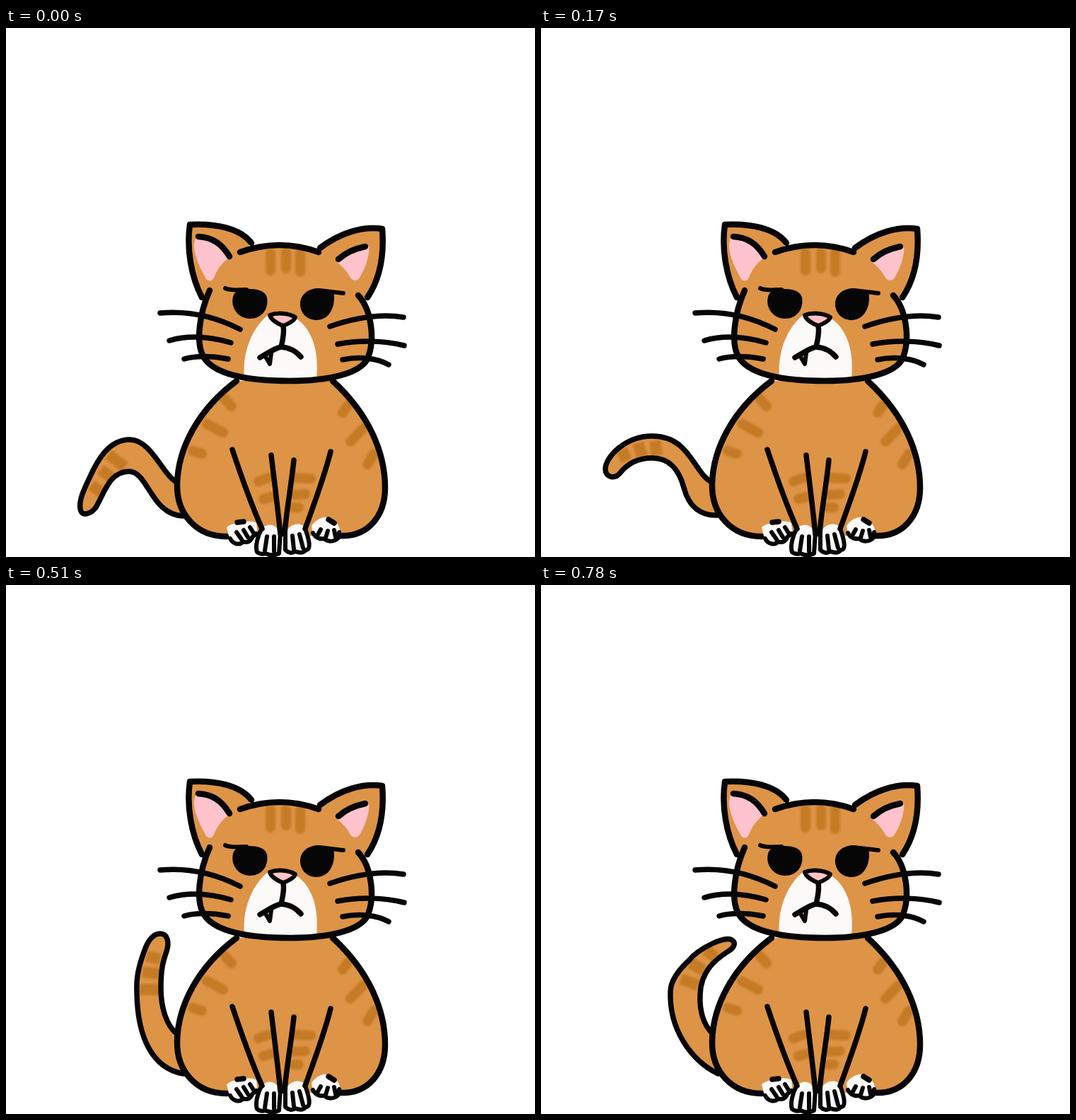
Write an HTML page that moves like this. It is 748 px wide and 748 px high and loops after 850 ms.

```html
<!DOCTYPE html>
<html lang="en">
<head>
<meta charset="utf-8">
<title>Grumpy cat</title>
<style>
  html, body { margin: 0; width: 100%; height: 100%; overflow: hidden; background: #fff; }
  svg { display: block; width: 100vw; height: 100vh; }
  .fur { fill: #de9447; }
  .ink { fill: none; stroke: #070606; stroke-width: 8.5; stroke-linecap: round; stroke-linejoin: round; }
  .mark { fill: none; stroke: #c57a25; stroke-width: 14; stroke-linecap: round; filter: blur(1.5px); }
  .tail .mark { stroke-width: 16; stroke-linecap: butt; }
  .pink { fill: #fec3cc; }
  .white { fill: #fbfaf9; }
  .black { fill: #070606; }
  .thin { stroke-width: 7.5; }
  .fine { stroke-width: 6; }
  .nose { fill: #fec3c6; }

  /* five tail poses, one at a time */
  .tail { opacity: 0; animation: pose 850ms step-end infinite; animation-delay: calc(var(--i) * 170ms - 850ms); }
  @keyframes pose {
    0% { opacity: 1; }
    20%, 100% { opacity: 0; }
  }
</style>
</head>
<body>
<svg viewBox="0 0 748 748">
  <defs>
    <path id="low" d="M243 643C222 634 206 582 175 582C145 582 129 612 119 634C109 655 103 668 105 680C107 692 120 687 127 678C139 658 146 627 174 627C201 627 205 688 250 690"/>
    <path id="curl" d="M243 643C215 630 212 577 157 577C120 577 91 606 91 624C91 635 104 639 112 629C124 614 140 608 157 608C182 608 195 624 202 650C209 677 226 690 250 689"/>
    <path id="rise" d="M243 643C228 613 226 590 219 568C212 547 190 541 178 537C160 530 146 526 136 527C122 528 114 538 114 546C114 558 128 559 137 561C152 563 172 567 183 578C202 598 197 632 205 657C210 674 230 689 250 691"/>
    <path id="high" d="M243 636C226 623 219 596 219 570C219 540 223 530 227 518C231 506 229 493 218 493C206 493 199 507 195 519C187 541 184 556 185 577C186 640 207 683 250 691"/>
    <path id="hook" d="M243 635C230 622 224 602 225 579C226 545 248 529 263 519C272 514 277 507 270 502C260 495 222 515 210 530C193 546 183 560 183 575C181 628 212 672 250 691"/>
  </defs>

  <g class="tail" style="--i:0">
    <use href="#low" class="fur"/>
    <path class="mark" d="M145 603L168 621M134 624L150 637M121 646L135 657"/>
    <use href="#low" class="ink thin"/>
  </g>
  <g class="tail" style="--i:1">
    <use href="#curl" class="fur"/>
    <path class="mark" d="M114 596L121 612M137 587L143 606M161 584L164 604"/>
    <use href="#curl" class="ink thin"/>
  </g>
  <g class="tail" style="--i:2">
    <use href="#rise" class="fur"/>
    <path class="mark" d="M144 533L144 555M166 538L165 561M191 547L183 571"/>
    <use href="#rise" class="ink thin"/>
  </g>
  <g class="tail" style="--i:3">
    <use href="#high" class="fur"/>
    <path class="mark" d="M199 525L218 529M193 547L217 550M189 572L217 572"/>
    <use href="#high" class="ink thin"/>
  </g>
  <g class="tail" style="--i:4">
    <use href="#hook" class="fur"/>
    <path class="mark" d="M233 516L247 527M211 534L230 545M198 557L222 566"/>
    <use href="#hook" class="ink thin"/>
  </g>

  <g id="body">
    <path class="fur" d="M326 499C271 540 243 595 242 645C241 688 270 719 312 719L474 718C512 719 536 690 536 650C536 600 513 546 462 499Z"/>
    <path class="mark" d="M309 524L319 535M284 560L307 572M264 598L277 602M483 534L476 544M505 566L487 585M520 602L511 617M357 641L371 636M364 666L375 663M409 636L431 637M408 660L423 659M406 678L414 678"/>
    <path class="ink" d="M326 499C271 540 243 595 242 645C241 688 270 719 312 719M462 499C513 546 536 600 536 650C536 690 512 719 474 718"/>
  </g>

  <g id="paws">
    <path class="white" d="M312 706C318 700 345 694 354 700L356 718L340 728L322 728L315 718Z"/>
    <path class="white" d="M432 704C440 692 455 688 463 696C472 703 475 712 470 724L450 726L434 716Z"/>
    <path class="white" d="M361 709C368 700 380 700 386 712L387 744L356 742Z"/>
    <path class="white" d="M397 710C404 700 418 698 424 708L430 738L397 743Z"/>
    <path class="ink thin" d="M320 596C332 632 346 672 362 708M375 604C380 645 385 685 388 716M407 611C403 650 396 685 394 716M459 599C450 635 436 672 423 708"/>
    <path class="ink thin" d="M327 699L336 698M456 695L464 700"/>
    <path class="ink fine" d="M317 722C321 730 331 732 335 726C341 729 347 725 348 720L354 715M326 713L333 723M336 710L342 720M345 706L350 714"/>
    <path class="ink fine" d="M434 714C438 722 446 723 450 722C455 727 464 727 470 721L471 713M445 709L440 718M455 711L452 721M464 710L466 720"/>
    <path class="ink fine" d="M361 709C356 718 352 733 355 741C360 745 364 744 367 743C373 746 380 746 386 743L388 714M369 719L366 739M379 719L379 740"/>
    <path class="ink fine" d="M395 714L395 738C400 743 406 743 409 740C416 743 421 742 424 738C431 738 430 727 423 708M405 718L407 737M415 716L420 735"/>
  </g>

  <g id="head">
    <path class="fur" d="M347 304C331 283 296 276 260 278C255 313 262 352 277 381L340 375L340 312Z"/>
    <path class="fur" d="M444 311C472 290 503 280 532 284C535 322 528 356 511 381L442 375Z"/>
    <path class="fur" d="M331 317Q387 297 442 317L498 378C516 397 523 440 511 468C500 489 455 499 402 499C350 499 300 492 282 469C266 449 274 402 288 371Z"/>
    <path class="mark" d="M374 318L374 343M396 318L396 340M416 318L416 345"/>
    <path class="pink" d="M268 297C285 296 305 306 315 325C303 334 298 343 294 353C291 359 285 359 282 353C272 335 265 318 266 305Z"/>
    <path class="pink" d="M513 308C515 320 508 340 500 353C497 358 490 358 487 353C482 344 476 337 467 330C478 320 494 312 513 308Z"/>
    <path class="white" d="M375 403C355 415 333 450 337 495C370 499 410 499 439 495C443 456 432 421 405 408Z"/>
    <path class="ink" d="M347 304C331 283 296 276 260 278C255 313 262 352 277 381M444 311C472 290 503 280 532 284C535 322 528 356 511 381M331 317Q387 297 442 317"/>
    <path class="ink" d="M288 371C274 402 266 449 282 469C300 492 350 499 402 499C455 499 500 489 511 468C523 440 516 397 498 378"/>
    <path class="ink" d="M272 295C292 296 305 305 316 323M470 327C481 317 493 312 508 309"/>
  </g>

  <g id="face">
    <path class="black" d="M321 380C323 371 335 368 345 369C358 369 367 373 369 381C372 398 361 411 345 411C329 411 317 396 321 380Z"/>
    <path class="black" d="M416 392C415 378 426 369 440 368C452 369 462 372 464 378C465 398 455 413 439 413C426 413 417 404 416 392Z"/>
    <path class="ink fine" d="M310 368C318 372 328 370 340 370M440 371C455 372 465 374 477 375"/>
    <path class="ink thin" d="M331 426C300 410 262 399 218 403M318 445C290 437 258 434 231 442M314 468C292 464 270 463 252 468"/>
    <path class="ink thin" d="M458 422C490 411 525 403 562 409M469 447C500 441 535 442 563 449M476 469C500 464 525 467 541 476"/>
    <path class="ink thin" d="M392 421C394 432 391 442 389 451M359 466C370 460 379 453 389 451C402 452 411 458 417 465"/>
    <path class="ink fine" d="M367 465L373 475L375 460"/>
    <path class="nose"  d="M373 406C383 402 400 403 409 409L392 421Z"/>
    <path class="ink fine" d="M373 406C383 402 400 403 409 409C408 414 397 419 392 421C385 419 374 412 373 406Z"/>
  </g>
</svg>
</body>
</html>
```
